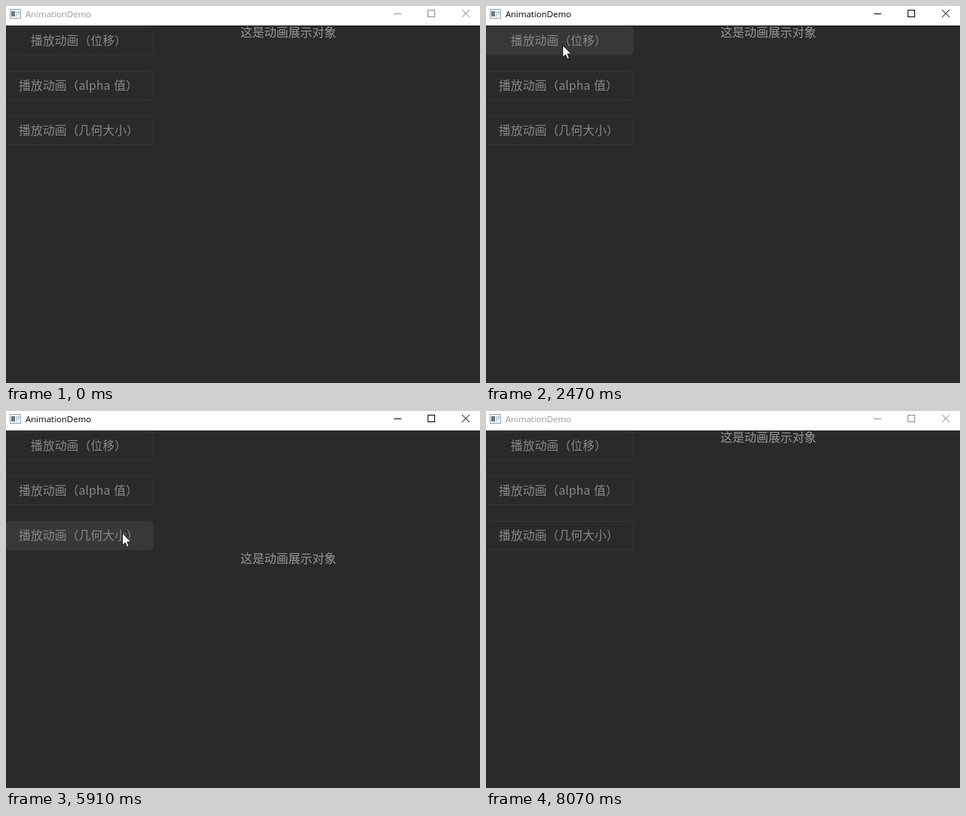
Animation, 633 px wide and 504 px high, one loop 8.2 s. Source, as an HTML page:

```html
<!DOCTYPE html>
<html lang="zh-CN">
<head>
<meta charset="utf-8">
<title>AnimationDemo</title>
<style>
  html, body { margin: 0; width: 100%; height: 100%; overflow: hidden; background: #292a2c; }
  svg { display: block; }
  .cjk { font: 300 16px "Noto Sans CJK SC", "Noto Sans CJK", "Noto Sans CJK JP", sans-serif; fill: #868788; }
  #label { fill: #97989a; }
  #title { font: 11.5px "Open Sans", "Noto Sans", sans-serif; }
</style>
</head>
<body>
<svg width="633" height="504" viewBox="0 0 633 504">
  <rect width="633" height="504" fill="#292a2c"/>
  <rect width="633" height="26" fill="#fff"/>
  <g id="icon">
    <rect x="5.5" y="4.5" width="14" height="12" fill="#f4f6f7" stroke="#9aa3a8"/>
    <rect x="7" y="7" width="5" height="7" fill="#68767f"/>
    <rect x="13" y="7" width="2" height="7" fill="#c5d3dc"/>
    <rect x="16" y="7" width="2" height="4" fill="#aebfca"/>
  </g>
  <text id="title" x="26" y="15">AnimationDemo</text>
  <g id="controls" fill="none">
    <path d="M518 10.5H528" shape-rendering="crispEdges"/>
    <rect x="563.5" y="5.5" width="9" height="9"/>
    <path d="M609 5L619 15M619 5L609 15"/>
  </g>
  <g id="buttons"></g>
  <g class="cjk">
    <text x="33" y="52">播放动画（位移）</text>
    <text x="17" y="112">播放动画（alpha</text>
    <text x="144" y="112">值）</text>
    <text x="17" y="172">播放动画（几何大小）</text>
  </g>
  <text id="label" class="cjk" x="313" y="41">这是动画展示对象</text>
  <path id="cursor" d="M.5 .5V16.5L4.2 13L6.8 18.8L9.2 17.8L6.7 12H11.8Z" fill="#fff" stroke="#111" stroke-width=".9"/>
</svg>
<script>
const LOOP = 8200;
const $ = id => document.getElementById(id);
const clamp = u => Math.min(1, Math.max(0, u));
const mix = (a, b, u) => a + (b - a) * u;
const linear = u => u;
const inQuad = u => u * u;
const outQuad = u => 1 - inQuad(1 - u);
const inOutQuad = u => u < .5 ? 2 * u * u : 1 - 2 * inQuad(1 - u);

// Each click jumps the label to its start value, then eases it home.
const move = { start: 1312, length: 1000, ease: inOutQuad };
const fade = { start: 2895, length: 1500, ease: inQuad };
const grow = { start: 4965, length: 2460, ease: inQuad };

const entry = { x: 500, y: 504, from: 100 };
const legs = [
  { from: entry.from, to: 1120, x: 101, y: 47, ease: outQuad },
  { from: 2440, to: 2800, x: 116, y: 103, ease: linear },
  { from: 3860, to: 4800, x: 146, y: 164, ease: linear },
  { from: 5500, to: 5850, x: 155, y: 163, ease: linear },
  { from: 6400, to: 7080, x: 517, y: 333, ease: linear },
  { from: 7080, to: 7780, x: 614, y: 504, ease: linear }
];
const exit = legs[legs.length - 1].to;

const buttons = [move, fade, grow].map((anim, i) => {
  const top = 27 + 60 * i;
  const box = document.createElementNS("http://www.w3.org/2000/svg", "rect");
  const size = { x: -.5, y: top + .5, width: 197, height: 38, rx: 4 };
  for (const key in size) box.setAttribute(key, size[key]);
  $("buttons").append(box);
  return { box, top, anim };
});

const progress = (a, t) => t < a.start ? 1 : a.ease(clamp((t - a.start) / a.length));

function cursorAt(t) {
  let { x, y } = entry;
  for (const leg of legs) {
    const u = leg.ease(clamp((t - leg.from) / (leg.to - leg.from)));
    x = mix(x, leg.x, u);
    y = mix(y, leg.y, u);
  }
  return { x: Math.round(x), y: Math.round(y) };
}

function render(t) {
  const active = t >= 90 && t < 8070;
  $("title").setAttribute("fill", active ? "#000" : "#999");
  $("controls").setAttribute("stroke", active ? "#000" : "#8c8c8c");

  const away = 1 - progress(move, t);
  const drop = 190 * (1 - progress(grow, t));
  const dx = Math.round(120 * away), dy = Math.round(400 * away + drop);
  $("label").setAttribute("transform", `translate(${dx} ${dy})`);
  // Opacity shows up in sixths.
  $("label").setAttribute("opacity", Math.floor(6 * progress(fade, t)) / 6);

  const { x, y } = cursorAt(t);
  for (const { box, top, anim } of buttons) {
    const hot = x < 197 && y >= top && y < top + 39;
    const pressed = hot && Math.abs(t - anim.start) < 150;
    const fill = pressed ? "#3f3f48" : hot ? "#383838" : "#292a2c";
    box.setAttribute("fill", fill);
    box.setAttribute("stroke", hot ? fill : "#343537");
  }

  const seen = t >= entry.from && t < exit;
  $("cursor").setAttribute("visibility", seen ? "visible" : "hidden");
  $("cursor").setAttribute("transform", `translate(${x} ${y})`);
}

const begin = performance.now();
function tick() {
  render((performance.now() - begin) % LOOP);
  requestAnimationFrame(tick);
}
tick();
</script>
</body>
</html>
```
